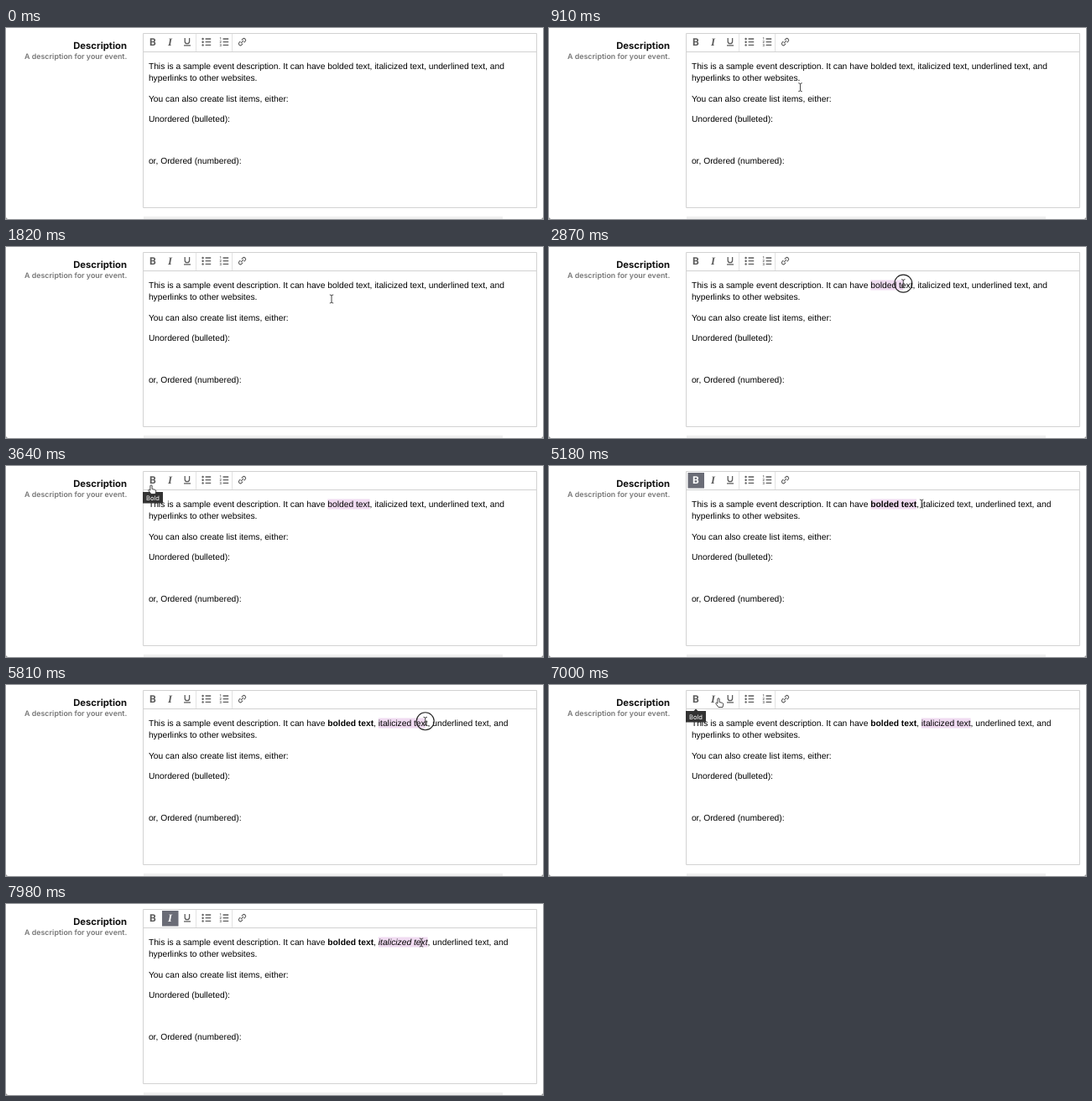
An HTML page that plays this animation: 640x228 px, repeating every 8000 ms.

```html
<!DOCTYPE html>
<html lang="en">
<head>
<meta charset="utf-8">
<title>Rich text editor</title>
<style>
  html, body { margin: 0; width: 100%; height: 100%; overflow: hidden; background: #fff; }
  svg { display: block; width: 640px; height: 228px; }
  text { white-space: pre; text-rendering: geometricPrecision; }
  .label { font: 700 11.3px Inter, sans-serif; text-anchor: end; fill: #111; }
  .hint { font: 600 8.9px Inter, sans-serif; text-anchor: end; fill: #777; }
  .body { font: 10.27px "Liberation Sans", Arial, sans-serif; fill: #000; }
  .tip { font: 7.6px Inter, sans-serif; text-anchor: middle; fill: #fff; }
  .icon { fill: none; stroke: #5c5c5c; stroke-width: 1.3; }
  .glyph { fill: #5c5c5c; text-anchor: middle; }
  .active rect { fill: #6a6c76; }
  .active .glyph { fill: #fff; }
  .bold { font-weight: 700; }
  .italic { font-style: italic; }
</style>
</head>
<body>
<svg viewBox="0 0 640 228">
  <rect width="640" height="228" fill="#fff"/>
  <path d="M0 226v2h2zM640 226v2h-2z" fill="#999"/>
  <rect x="164" y="225" width="428" height="3" fill="#f0f0f0"/>
  <text class="label" x="144" y="24.5">Description</text>
  <text class="hint" x="144.3" y="37.4">A description for your event.</text>

  <path d="M163.5 6.5h469v208h-469zM163.5 28.5h469" fill="none" stroke="#d2d2d2"/>
  <path d="M226.5 7v21M269.5 7v21" stroke="#e2e2e2"/>

  <g id="boldButton">
    <rect x="165.5" y="8" width="19.5" height="18.5" fill="none"/>
    <text class="glyph" x="175" y="21" style="font:700 12.3px Roboto,sans-serif">B</text>
  </g>
  <g id="italicButton">
    <rect x="186" y="8" width="19.5" height="18.5" fill="none"/>
    <text class="glyph" x="195.5" y="21" style="font:italic 700 12.8px 'Liberation Serif',serif">I</text>
  </g>
  <path class="icon" d="M213.2 12v4a2.7 2.7 0 0 0 5.4 0v-4M212 20.9h8"/>
  <path class="icon" d="M237.6 13h6.6m-6.6 3.7h6.6m-6.6 3.7h6.6M258.6 13h6.6m-6.6 3.7h6.6m-6.6 3.7h6.6"/>
  <path class="icon" d="M234.6 13h0m0 3.7h0m0 3.7h0" style="stroke-width:2.4;stroke-linecap:round"/>
  <g class="glyph" style="font:700 4.2px Roboto,sans-serif">
    <text x="255.6" y="14.4">1</text><text x="255.6" y="18.2">2</text><text x="255.6" y="22">3</text>
  </g>
  <g class="icon" transform="translate(281.5 16.6) rotate(-45)" style="stroke-width:1.1">
    <path d="M-1-2h-2a2 2 0 0 0 0 4h2M1-2h2a2 2 0 0 1 0 4h-2M-2.2 0h4.4"/>
  </g>

  <rect id="selection" y="39.5" height="12" fill="#f0dbf1"/>
  <g class="body">
    <text x="169.9" y="48.9">This is a sample event description. It can have <tspan id="boldText">bolded text</tspan>, <tspan id="italicText">italicized text</tspan>, underlined text, and</text>
    <text x="169.9" y="63.3">hyperlinks to other websites.</text>
    <text x="169.9" y="87.8">You can also create list items, either:</text>
    <text x="169.9" y="112.4">Unordered (bulleted):</text>
    <text x="169.9" y="161.5">or, Ordered (numbered):</text>
  </g>

  <g id="tooltip">
    <path d="M163 31h9.5l2.5-2.5 2.5 2.5h9.5v13.5h-24z" fill="#333"/>
    <text class="tip" x="175" y="40.5">Bold</text>
  </g>

  <g id="cursor" stroke="#333" stroke-width=".9">
    <circle id="ring" fill="none" stroke="#222" stroke-width="1.1"/>
    <path id="beam" fill="none" d="M-2.2-5q2.2 0 2.2 1.5q0-1.5 2.2-1.5M0-3.5v7M-2.2 5q2.2 0 2.2-1.5q0 1.5 2.2 1.5"/>
    <path id="hand" fill="#fff" d="M-1.1.9a1.1 1.1 0 0 1 2.2 0v3.6l3.4.8q1.4.4 1.2 1.9l-.7 3.4h-5l-3-4q-.7-1.4.7-1.5l1.2 1z"/>
    <path id="arrow" fill="#111" stroke="#fff" stroke-width=".7" d="M0 0v10l2.3-2.1 1.6 3.5 1.5-.7-1.6-3.4h3.2z"/>
  </g>
</svg>
<script>
const LOOP = 8000, STEP = 70, FADE = 200, ENTER = 420;
const $ = id => document.getElementById(id);
const show = (id, on) => $(id).style.display = on ? "" : "none";
const clamp = (v, a, b) => Math.min(b, Math.max(a, v));
const smooth = u => u * u * (3 - 2 * u);
const within = (t, a, b) => t >= a && t < b;

// Each task drags over a word, then clicks its toolbar button.
const tasks = [
  { style: "bold", from: 383.5, to: 440, button: [173, 23], approach: 2030, grab: 2400, drop: 3150, click: 3920 },
  { style: "italic", from: 444, to: 509, button: [202, 16], approach: 4340, grab: 5200, drop: 6000, click: 7280 }
];
const [bold, italic] = tasks;

const leg = (start, end, x, y) => ({ start, end, x, y });
const gesture = task => [
  leg(task.approach, task.grab, task.from, 45),
  leg(task.grab, task.drop, task.to, 43),
  leg(task.click - 770, task.click - 280, ...task.button)
];
const path = [
  leg(ENTER, 1190, 380, 47),
  leg(1400, 1820, 388, 62),
  ...gesture(bold),
  leg(bold.click + 90, 4270, 462, 67),
  ...gesture(italic),
  leg(italic.click + 140, 7910, 495, 46)
];

function pointerAt(t) {
  let x = 112, y = 126;
  for (const to of path) {
    const k = smooth(clamp((t - to.start) / (to.end - to.start), 0, 1));
    x += (to.x - x) * k;
    y += (to.y - y) * k;
  }
  return [x, y];
}

// 1 while the button is held, then fading to 0
const press = (t, down, up) => t < down ? 0 : 1 - clamp((t - up) / FADE, 0, 1);
const ringAt = t => Math.max(...tasks.flatMap(({ grab, drop, click }) =>
  [press(t, grab, drop), press(t, click, click + STEP)]));

function drawSelection(t, x) {
  const task = t < italic.grab ? bold : italic;
  const word = $(task.style + "Text");
  const start = word.getStartPositionOfChar(0).x;
  const full = word.getComputedTextLength();
  const width = t < task.drop ? clamp(x - start, 0, full) : full;
  $("selection").setAttribute("x", start);
  $("selection").setAttribute("width", t < task.grab ? 0 : width);
}

function draw(t) {
  const [x, y] = pointerAt(t);
  $("cursor").setAttribute("transform", `translate(${x} ${y})`);
  show("cursor", t >= ENTER);
  show("arrow", x < 164);
  show("hand", x >= 164 && y < 28);
  show("beam", x >= 164 && y >= 28);

  const strength = ringAt(t);
  $("ring").setAttribute("r", 12 - 1.5 * strength);
  $("ring").setAttribute("opacity", strength);

  for (const { style, click } of tasks) {
    const applied = t >= click + STEP;
    $(style + "Text").classList.toggle(style, applied);
    $(style + "Button").classList.toggle("active", applied && (style === "italic" || t < italic.grab));
  }
  show("tooltip", tasks.some(({ click }) => within(t, click - 280, click - 70)));
  drawSelection(t, x);
}

const begin = performance.now();
function tick() {
  const t = (performance.now() - begin) % LOOP;
  draw(Math.floor(t / STEP) * STEP);
  requestAnimationFrame(tick);
}
tick();
</script>
</body>
</html>
```
